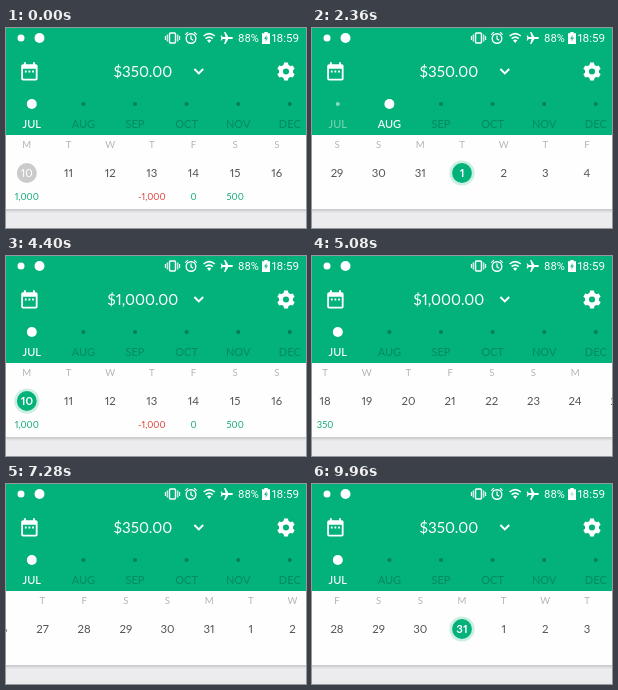
An HTML page that plays this animation: 300 px wide and 200 px high, repeating every 10 s.

```html
<!DOCTYPE html>
<html lang="en">
<head>
<meta charset="utf-8">
<title>Budget calendar</title>
<style>
  html, body { margin: 0; width: 100%; height: 100%; overflow: hidden; background: #ececee; }
  svg { display: block; width: 300px; height: 200px; }
  text { font-family: Lato, sans-serif; font-variant-numeric: proportional-nums; text-anchor: middle; }
  .status text { font-family: Roboto, sans-serif; text-anchor: start; fill: #fff; }
  .line { fill: none; stroke: #fff; }
</style>
</head>
<body>
<svg viewBox="0 0 300 200">
  <defs>
    <linearGradient id="shade" x2="0" y2="1">
      <stop stop-color="#c6c6c9"/>
      <stop offset="1" stop-color="#ececee"/>
    </linearGradient>
  </defs>
  <rect width="300" height="200" fill="#ececee"/>
  <rect y="106" width="300" height="76" fill="#fefefe"/>
  <rect y="181" width="300" height="4" fill="url(#shade)"/>
  <g id="strip"></g>
  <rect width="300" height="107" fill="#03b17b"/>

  <g class="status">
    <circle cx="15" cy="10" r="3.5" fill="#fff"/>
    <circle cx="33.5" cy="10" r="5" fill="#fff"/>
    <rect class="line" x="163.5" y="5" width="6" height="10" rx="1" stroke-width="1.5"/>
    <path class="line" d="M161.2 6.5v7M171.8 6.5v7M159.4 8v4M173.6 8v4" stroke-width="1.1"/>
    <circle class="line" cx="185" cy="10.5" r="4.8" stroke-width="1.4"/>
    <path class="line" d="M185 7.6v3.2l2.2 1.4M179.2 6.6l2.7-2.3M190.8 6.6l-2.7-2.3" stroke-width="1.2"/>
    <path class="line" d="M197.6 8q5.6-4.6 11.2 0M199.6 10.6q3.6-3 7.2 0" stroke-width="1.6"/>
    <path d="M201 12.2q2.2-1.6 4.4 0l-2.2 2.8z" fill="#fff"/>
    <path d="M227 10q0-1-1.2-1h-3.4l-3-5h-1.3l1.5 5h-2.9l-1.1-1.5h-1l.7 2.5-.7 2.5h1l1.1-1.5h2.9l-1.5 5h1.3l3-5h3.4q1.2 0 1.2-1z" fill="#fff"/>
    <text x="232" y="14" font-size="11">88%</text>
    <path d="M258.3 4h3.4v1.3h2.3v10.7h-8v-10.7h2.3z" fill="#fff"/>
    <path id="bolt" d="M260.5 7l-2.5 4h1.6v2.6l2.5-4h-1.6z" fill="#03b17b"/>
    <text x="265.5" y="14" font-size="11.6">18:59</text>
  </g>

  <g transform="translate(23.4 43.5) scale(.91)">
    <path d="M-7-8h14q2 0 2 2v14q0 2-2 2h-14q-2 0-2-2v-14q0-2 2-2zM-7-3v11h14v-11z" fill="#fff" fill-rule="evenodd"/>
    <path class="line" d="M-5-10v3M5-10v3M-5 0h10" stroke-width="2" stroke-dasharray="2"/>
    <path class="line" d="M-5-10v3M5-10v3" stroke-width="2"/>
  </g>
  <text id="price" x="136.8" y="49.2" font-size="15.2" fill="#fff"></text>
  <path class="line" d="M188.4 41l4.4 4.4 4.4-4.4" stroke-width="1.9"/>
  <g id="gear" transform="translate(280 43.5)"></g>
  <g id="months"></g>
</svg>
<script>
const LOOP = 10000, CELL = 300 / 7.2, BLINK = 511;
const GREEN = '#03b17b', RED = '#e2403c', INK = '#545457';
const AMOUNTS = { 10: '1,000', 13: '-1,000', 14: '0', 15: '500', 18: '350' };

// Scroll moves: start, end, from, to, ease-out power
const END = 21 * CELL - 87.5;
const MOVES = [
  [1600, 2040, 0, END, 2],
  [3240, 3880, END, 0, 2.4],
  [4560, 5560, 0, 360, 4],
  [5560, 5920, 360, 569, 3],
  [6040, 6440, 569, 692, 3],
  [7280, 7540, 692, END, 2],
  [8570, 8820, END, END - CELL, 2]
];
// Selected spans by day (32 is the first of August)
const PICKS = { 10: [[3280, 7280]], 31: [[8600, LOOP]], 32: [[1640, 3280], [7280, 8600]] };
const AUGUST = PICKS[32];

const $ = id => document.getElementById(id);
const clamp = v => Math.min(1, Math.max(0, v));
const mix = (a, b, p) => a + (b - a) * p;

function add(parent, tag, attrs, text) {
  const el = document.createElementNS('http://www.w3.org/2000/svg', tag);
  for (const k in attrs) el.setAttribute(k, attrs[k]);
  if (text) el.textContent = text;
  parent.append(el);
  return el;
}

// 0..1 strength of a state that fades in and out over its spans
const level = (spans, t, fade = 160) => Math.max(0, ...spans.map(([on, off]) =>
  Math.min(clamp((t - on) / fade), off === LOOP ? 1 : 1 - clamp((t - off) / fade))));

for (let i = 0; i < 6; i++)
  add($('gear'), 'path', { d: 'M-1.9-8.9h3.8l1 4h-5.8z', fill: '#fff', transform: `rotate(${i * 60})` });
add($('gear'), 'circle', { r: 5, class: 'line', 'stroke-width': 3.9 });

const months = ['JUL', 'AUG', 'SEP', 'OCT', 'NOV', 'DEC'].map((name, i) => {
  const x = 25.8 + i * 51.6;
  return {
    dot: add($('months'), 'circle', { cx: x, cy: 76, r: 2, fill: '#047d57' }),
    label: add($('months'), 'text', { x, y: 100, 'font-size': 11, fill: '#058a60' }, name)
  };
});

const marks = {};
for (let d = 10; d <= 42; d++) {
  const x = CELL * (d - 9.5), strip = $('strip');
  const put = (y, size, fill, s) => add(strip, 'text', { x, y, 'font-size': size, fill }, s);
  put(119.6, 9.6, '#b4b4b6', 'MTWTFSS'[(d - 10) % 7]);
  if (d === 10) add(strip, 'circle', { cx: x, cy: 145, r: 10, fill: '#cbcbcb' });
  if (PICKS[d]) {
    const g = add(strip, 'g', {});
    add(g, 'circle', { r: 12.6, fill: '#cdefe2' });
    add(g, 'circle', { r: 9.9, fill: GREEN });
    marks[d] = { g, x };
  }
  const num = put(149.3, 11.4, INK, d > 31 ? d - 31 : d);
  if (marks[d]) marks[d].num = num;
  const sum = AMOUNTS[d];
  if (sum) put(171.8, 9.3, sum[0] === '-' ? RED : '#10a871', sum);
}

function scrollAt(t) {
  let x = 0;
  for (const [a, b, from, to, pow] of MOVES)
    if (t >= a) x = mix(from, to, 1 - (1 - clamp((t - a) / (b - a))) ** pow);
  return x;
}

function setMonth({ dot, label }, p, rest, restDot) {
  dot.setAttribute('r', mix(2, 5, p));
  dot.setAttribute('fill', p > 0.05 ? '#fff' : restDot);
  label.setAttribute('fill', p > 0.4 ? '#fff' : rest);
  label.setAttribute('font-weight', p > 0.4 ? 500 : 400);
}

function draw(t) {
  $('strip').setAttribute('transform', `translate(${-scrollAt(t)} 0)`);
  $('price').textContent = t >= 3280 && t < 7280 ? '$1,000.00' : '$350.00';
  $('bolt').setAttribute('opacity', Math.floor((t + 150) / BLINK) % 2 ? 0.3 : 0.8);

  for (const d in marks) {
    const { g, x, num } = marks[d], p = level(PICKS[d], t);
    g.setAttribute('transform', `translate(${x} 145) scale(${p})`);
    num.setAttribute('fill', p > 0.5 || d === '10' ? '#fff' : INK);
    num.setAttribute('font-weight', p > 0.5 ? 700 : 400);
  }

  const aug = level(AUGUST, t);
  setMonth(months[0], 1 - aug, '#7fd5b6', '#8adabd');
  setMonth(months[1], aug, '#058a60', '#047d57');
}

const start = performance.now();
function tick() {
  draw((performance.now() - start) % LOOP);
  requestAnimationFrame(tick);
}
tick();
</script>
</body>
</html>
```
